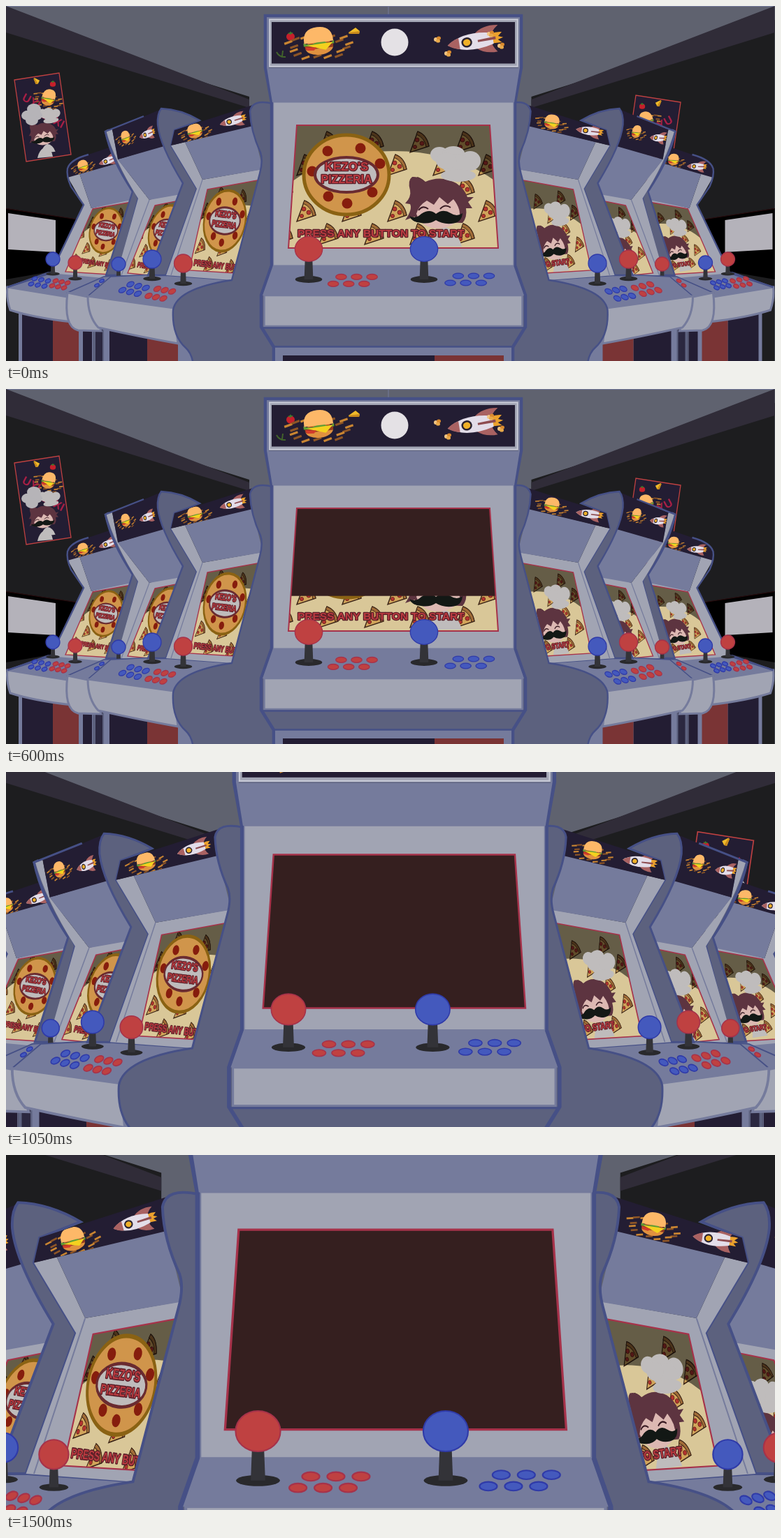
An HTML page with a canvas that plays this animation: 1100 by 509 pixels, repeating every 4500 ms.

```html
<!DOCTYPE html>
<html lang="en">
<head>
<meta charset="utf-8">
<title>Arcade</title>
<style>
html, body { margin: 0; width: 100%; height: 100%; overflow: hidden; background: #1d1d1f; }
canvas { display: block; }
</style>
</head>
<body>
<canvas id="stage" width="1100" height="509"></canvas>
<script>
const ctx = document.getElementById('stage').getContext('2d');
const LOOP = 4500, MIRROR = 1099.5;
const LIGHT = '#a1a4b3', BLUE = '#757b9c', SHADE = '#5c617e', EDGE = '#465086', NAVY = '#231d33';
const RED = '#bf4141', CRIMSON = '#a6324a', DOOR = '#7a3435', CLOTH = '#bfbcbc', HAIR = '#5d3440';
const PLAYER = { r: ['#bf4141', '#a6324a'], b: ['#4459bd', '#2f3aa8'] };

function shape(d, fill, stroke, width = 2) {
  const p = new Path2D(d);
  if (fill) { ctx.fillStyle = fill; ctx.fill(p); }
  if (stroke) { ctx.strokeStyle = stroke; ctx.lineWidth = width; ctx.stroke(p); }
}

function oval(x, y, rx, ry, fill, stroke, width = 2, turn = 0) {
  ctx.beginPath();
  ctx.ellipse(x, y, rx, ry, turn, 0, 7);
  if (fill) { ctx.fillStyle = fill; ctx.fill(); }
  if (stroke) { ctx.strokeStyle = stroke; ctx.lineWidth = width; ctx.stroke(); }
}

function group(draw, ...matrix) {
  ctx.save();
  if (matrix.length) ctx.transform(...matrix);
  draw();
  ctx.restore();
}

const unflip = () => ctx.transform(-1, 0, 0, 1, MIRROR, 0);

function label(text, x, y, size, align = 'center') {
  ctx.font = `bold ${size}px "Liberation Sans", Arial, sans-serif`;
  ctx.textAlign = align;
  ctx.textBaseline = 'middle';
  ctx.lineJoin = 'round';
  ctx.strokeStyle = '#5a1f28';
  ctx.lineWidth = 2.6;
  ctx.strokeText(text, x, y);
  ctx.fillStyle = '#bb3b40';
  ctx.fillText(text, x, y);
}

// Marquee icons, drawn around the origin
function burger() {
  for (let i = 0; i < 18; i++) {
    const a = i * 0.36 - 0.55, r = 25 + (i * 7 % 10);
    group(() => {
      ctx.fillStyle = i % 2 ? '#c98532' : '#8d5526';
      ctx.fillRect(-6, -1.6, 12, 3.2);
    }, 0.94, -0.34, 0.34, 0.94, Math.cos(a) * r * 1.4, Math.sin(a) * r * 0.55 + 7);
  }
  group(() => {
    oval(0, 9, 20, 11, '#e0913f');
    shape('M-21 3 L21 3 L20 11 L-20 11Z', '#8f3b22');
    shape('M-22 1 Q-12 6 -4 2 T10 3 T22 1 L22 6 L-22 6Z', '#5f9d35');
    shape('M-18 5 L20 4 L9 14Z', '#f4d11f');
    shape('M-20 7 L-4 9 L-8 13 L-18 12Z', '#d23b2b');
    shape('M-21 2 Q-22 -20 0 -20 Q22 -20 21 2Z', '#fdb868');
  }, 0.99, -0.12, 0.12, 0.99, 0, 0);
}

function rocket() {
  group(() => {
    shape('M28 -7 Q36 -9 44 -7 L38 -2 L45 1 L37 3 L42 8 L28 7Z', '#eba12d');
    shape('M4 -10 Q18 -22 40 -18 Q28 -10 28 -2Z M4 10 Q16 21 34 20 Q26 10 28 2Z', '#a96262');
    shape('M-36 0 Q-10 -18 30 -8 L30 8 Q-10 18 -36 0Z', '#e3dde9');
    shape('M-36 0 Q-29 -6 -19 -8 L-19 8 Q-29 6 -36 0Z', '#a96262');
    oval(-8, 0, 6.5, 6, '#efb028', '#2a2230', 2.5);
    shape('M8 -1 L34 -2 L34 2 L8 2Z', '#8e4c50');
  }, 0.98, -0.16, 0.16, 0.98, 0, 0);
}

function tomato() {
  oval(0, 0, 6, 5.5, '#c5202b');
  shape('M-4 -5 L0 -3 L4 -6 L1 -6 L0 -8 L-1 -6Z', '#3f7c2c');
}

function cheese() {
  shape('M-8 2 L2 -5 L8 0 L7 4 L-7 4Z', '#f0bb2a');
  shape('M-8 2 L8 0 L7 4 L-7 4Z', '#c98a1c');
}

function popcorn(x, y) {
  oval(x - 2, y, 3, 3, '#f2c583');
  oval(x + 2, y - 2, 3, 2.6, '#d98a2e');
  oval(x + 1, y + 2, 3, 2.6, '#e8a94a');
}

function icon(draw, x, y, sx, sy, turn) {
  const c = Math.cos(turn), s = Math.sin(turn);
  group(draw, c * sx, s * sx, -s * sy, c * sy, x, y);
}

// Game picture, in the coordinates of the middle screen
function slice(x, y) {
  group(() => {
    shape('M-3 -15 Q10 -10 13 6 L-14 15Z', '#d1a45a', '#3b2417', 1.4);
    shape('M-3 -15 Q10 -10 13 6 L9 7 Q7 -6 -5 -11Z', '#a26d38', '#3b2417', 1);
    oval(-4, -3, 3, 3, '#b5342f', '#5c1c18', 0.8);
    oval(3, 2, 3, 3, '#b5342f', '#5c1c18', 0.8);
    oval(-7, 7, 2.6, 2.6, '#b5342f', '#5c1c18', 0.8);
  }, 1, 0, 0, 1, x, y);
}

function pizza() {
  oval(487, 242, 61, 57, '#d0954b', '#8a6213', 5);
  [[460, 208], [507, 204], [438, 237], [535, 226], [461, 273], [524, 267], [488, 283]]
    .forEach(([x, y]) => oval(x, y, 7.5, 7.5, '#861d0d'));
  oval(487, 242, 45, 25, CLOTH, '#6a2b30', 4);
  label("KEZO'S", 487, 231, 17);
  label('PIZZERIA', 487, 250, 16);
}

function chef() {
  shape('M606 345 Q612 322 628 317 Q646 322 652 345Z', CLOTH);
  shape('M571 307 Q582 291 578 284 L571 283 Q580 274 578 264 Q574 250 581 245 Q592 244 600 252 '
    + 'Q622 242 644 254 Q656 262 660 274 L669 274 L661 281 L667 290 L658 290 Q660 303 653 311 L584 309 L585 302Z', HAIR);
  shape('M587 298 Q590 286 602 279 L612 285 L620 274 L632 284 L640 277 Q652 292 648 305 Q637 319 617 319 Q594 318 587 298Z', '#dcb8b2');
  shape('M590 293 Q596 285 604 291 M621 291 Q628 283 636 289', null, '#3a1c24', 2);
  shape('M577 301 Q586 306 594 298 Q606 290 615 298 Q625 290 636 297 Q645 303 653 297 Q652 311 637 312 '
    + 'Q624 313 615 307 Q606 313 594 311 Q580 310 577 301Z', '#131815');
  [[620, 213, 13, 11], [640, 211, 16, 10], [664, 222, 15, 14], [646, 228, 22, 15], [630, 222, 15, 12], [647, 243, 25, 9]]
    .forEach(([x, y, rx, ry]) => oval(x, y, rx, ry, CLOTH));
}

function game() {
  ctx.fillStyle = '#d9c798';
  ctx.fillRect(250, 60, 600, 400);
  for (let r = 0; r < 5; r++)
    for (let c = 0; c < 5; c++) slice(397 + r % 2 * 33 + 65 * c, 195 + 33 * r);
  ctx.beginPath();
  ctx.rect(250, 60, 600, 270);
  ctx.moveTo(745, 330);
  ctx.ellipse(555, 330, 190, 122, 0, 0, Math.PI, true);
  ctx.closePath();
  ctx.fillStyle = 'rgba(0,0,0,.535)';
  ctx.fill('evenodd');
  pizza();
  chef();
  label('PRESS ANY BUTTON TO START', 417, 327, 15.5, 'left');
}

function joystick(x, y, rx, ry, foot, player) {
  const w = rx * 0.24;
  oval(x, foot, rx * 0.98, rx * 0.25, '#29292c');
  shape(`M${x - w} ${y} L${x + w} ${y} L${x + w * 1.35} ${foot} L${x - w * 1.35} ${foot}Z`, '#333338');
  oval(x, y, rx, ry, PLAYER[player][0], PLAYER[player][1], 1.3);
}

function buttons(x, y, dx, dy, off, drop, rx, ry, player, turn = 0) {
  for (let i = 0; i < 6; i++) {
    const c = i % 3, low = i > 2;
    oval(x + c * dx - (low ? off : 0), y + c * dy + (low ? drop : 0), rx, ry, ...PLAYER[player], 1.3, turn);
  }
}

// Side machines, described for the left wall; the right wall mirrors them
const FAR = {
  legs: [['M18 438 H124 V509 H18Z', BLUE], ['M23 440 H67 V509 H23Z', NAVY], ['M67 446 H104 V509 H67Z', DOOR], ['M110 460 H123 V509 H110Z', NAVY]],
  desk: 'M2 403 L60 382 L165 388 L92 418Z',
  front: 'M2 403 L94 418 V453 Q40 447 6 436 Q0 418 2 403Z',
  body: 'M88 245 L105 240 L122 290 L200 270 L160 392 L64 383 L111 285Z',
  canopy: 'M105 240 L165 224 L192 266 L184 277 L122 290Z',
  screen: 'M124 291 L190 279 L165 386 L85 381Z',
  head: 'M90 231 Q95 223 112 215 L165 197 V224 L88 246Z',
  rim: 'M118 213 Q92 220 88 233 Q86 243 93 259 L111 285 L64 383 L2 403',
  art: [[.37, .06, -.12, .56, 143, 322, 487, 242], [.38, -.06, .15, .52, 960, 317, 643, 226]],
  icons: [[110, 229, 145, 222, .36, .42, -.18], [955, 220, 987, 230, .36, .42, .22]],
  sticks: [[67, 363, 10, 384, 0], [99, 368, 10, 391, 1]],
  pads: [[41, 391, 9.5, 1.6, 5, 7.5, 4, 2.7, 0], [71, 394, 8.5, 1.5, 5, 7, 4, 2.7, 1]]
};
const MID = {
  legs: [['M124 455 H142 V509 H124Z', SHADE], ['M128 460 H138 V509 H128Z', '#2b2840']],
  desk: 'M88 411 L140 388 L215 384 L120 419Z',
  front: 'M88 411 L122 418 L136 466 L103 465 Q82 460 88 411Z',
  side: 'M142 180 Q152 220 181 266 L143 386 H160 L189 276 L146 178Z',
  body: 'M143 178 L152 177 L160 220 L205 278 L255 262 L213 388 L158 386 L189 276 Q155 222 143 178Z',
  canopy: 'M160 220 L238 196 L256 252 L250 270 L205 278Z',
  screen: 'M213 286 L252 278 L213 387 L174 383Z',
  head: 'M152 177 L222 148 L240 197 L160 220Z',
  line: 'M205 278 L165 386',
  rim: 'M197 158 L142 180 Q150 220 181 266',
  art: [[.38, .06, -.17, .63, 229, 322, 487, 242], [.4, -.07, .15, .6, 879, 317, 643, 226]],
  icons: [[171, 188, 201, 184, .3, .46, -.15], [902, 180, 932, 189, .3, .46, .3]],
  sticks: [[161, 370, 10, 393, 0]],
  pads: [[137, 394, 7.5, 1.8, 7, 6.5, 3.6, 2.2, 0]]
};
const NEAR = {
  legs: [['M140 455 H275 V509 H140Z', BLUE], ['M148 458 H202 V509 H148Z', NAVY], ['M202 464 H246 V509 H202Z', DOOR]],
  desk: 'M117 416 L150 388 L211 385 L323 393 Q250 405 240 434Z',
  front: 'M117 416 L240 433 L246 484 Q190 474 132 461 Q117 445 117 416Z',
  side: 'M222 147 Q250 148 277 164 L241 178 L236 200 L273 262 L229 386 H203 L253 254 Q220 200 217 170 Q216 155 222 147Z',
  body: 'M236 200 L256 195 L281 249 L366 234 L323 393 L229 386 L273 262Z',
  canopy: 'M256 195 L352 171 L366 228 L363 235 L281 249Z',
  screen: 'M288 263 L364 249 L328 383 L262 379Z',
  head: 'M241 178 L353 142 V172 L236 200Z',
  line: 'M281 249 L236 386',
  panel: 'M382 140 Q352 133 349 151 Q350 180 364 210 Q368 222 363 240 L323 393 Q244 405 239 436 Q237 472 257 490 Q266 498 268 515 H390Z',
  art: [[.48, .06, -.127, .76, 313, 308, 487, 242], [.5, -.07, .105, .69, 783, 352, 615, 302]],
  icons: [[270, 179, 323, 165, .5, .52, -.12], [781, 166, 833, 179, .5, .52, .3]],
  sticks: [[209, 363, 13, 391, 0], [253.5, 369, 13, 398, 1]],
  pads: [[178, 399, 11, 2.6, 11.5, 8.3, 5.5, 3.4, 0], [216.5, 405.5, 10.5, 1.9, 12.5, 10, 5.5, 3.4, 1]]
};

function machine(m, right) {
  const colours = right ? 'rb' : 'br';
  group(() => {
    if (right) unflip();
    m.legs.forEach(([d, fill]) => shape(d, fill));
    shape(m.desk, BLUE, EDGE, 1.5);
    shape(m.front, LIGHT, BLUE, 3);
    if (m.side) shape(m.side, SHADE, EDGE, 2.4);
    shape(m.body, LIGHT);
    if (m.line) shape(m.line, null, BLUE, 1.2);
    shape(m.canopy, BLUE);
    group(() => {
      ctx.clip(new Path2D(m.screen));
      if (right) unflip();
      const [a, b, c, d, x, y, u, v] = m.art[+right];
      group(game, a, b, c, d, x - a * u - c * v, y - b * u - d * v);
    });
    shape(m.screen, null, CRIMSON, 1.3);
    shape(m.head, NAVY);
    group(() => {
      ctx.clip(new Path2D(m.head));
      if (right) unflip();
      const [x, y, u, v, sx, sy, turn] = m.icons[+right];
      icon(burger, x, y, sx, sy, turn);
      icon(rocket, u, v, sx, sy, turn);
    });
    if (m.rim) shape(m.rim, null, EDGE, 2.4);
    m.pads.forEach(([x, y, dx, dy, off, drop, rx, ry, p]) =>
      buttons(x, y, dx, dy, off, drop, rx, ry, colours[p], -0.45));
    m.sticks.forEach(([x, y, r, foot, p]) => joystick(x, y, r, r, foot, colours[p]));
    if (m.panel) shape(m.panel, SHADE, EDGE, 2.4);
  });
}

function poster() {
  shape('M12 106 L76 96 L93 213 L29 223Z', NAVY, RED, 1.3);
  icon(burger, 61, 131, .45, .6, .35);
  icon(cheese, 44, 107, .6, .8, 1.2);
  icon(tomato, 67, 112, .7, .7, 0);
  ctx.font = '900 17px "Liberation Sans", Arial, sans-serif';
  ctx.textAlign = 'center';
  ctx.fillStyle = '#a81f45';
  group(() => ctx.fillText('UYI', 0, 0), .85, .45, -.45, .85, 34, 141);
  group(() => ctx.fillText('LEXI', 0, 0), .85, .45, -.45, .85, 64, 167);
  shape('M45 218 Q48 204 57 203 Q66 206 67 216Z', CLOTH);
  group(chef, .44, -.06, .04, .44, -230, 96);
  [[31, 157, 9], [40, 148, 10], [44, 157, 8], [37, 164, 9]].forEach(([x, y, r]) => oval(x, y, r, r * .8, '#b6b4b8'));
}

function room() {
  ctx.fillStyle = '#5f626f';
  ctx.fillRect(-20, -20, 1140, 560);
  shape('M0 .5 H1100 M547 0 V100', null, BLUE, 1);
  const wall = () => {
    shape('M0 20 L348 130 V509 H0Z', '#1d1d1f');
    shape('M0 290 L115 308 V372 L0 392Z', '#000');
    shape('M0 290.5 L115 308', null, '#2a0b0d', 1);
    shape('M0 0 L348 134 V146 L0 38Z', '#302c38');
    shape('M3 297 L71 307 V353 L3 349Z', '#b4b2ba');
  };
  wall();
  group(wall, -1, 0, 0, 1, MIRROR, 0);
  poster();
  group(poster, -1, 0, 0, 1, 977, 32);
}

function mainMachine(dark) {
  const quad = 'M416 171 H692 L704 347 H404Z';
  shape('M371 14 H737 V88 L728 138 V372 L743 415 V460 L725 489 V515 H383 V489 L365 460 V415 L380 372 V138 L371 88Z', SHADE, EDGE, 4.5);
  shape('M373 16 H735 V88 L727 138 H381 L373 88Z', BLUE);
  shape('M376 18 H733 V88 H376Z', LIGHT);
  shape('M377 19.5 H731.5 V86.5 H377Z', null, '#c9ccd9', 1.5);
  shape('M380 23 H728 V82.5 H380Z', NAVY);
  shape('M376 88.5 H733', null, SHADE, 1);
  icon(tomato, 407, 44, 1, 1, 0);
  icon(cheese, 498, 36, 1, 1, 0);
  shape('M387 66 Q391 74 400 73 M396 64 L395 72', null, '#42632b', 2);
  icon(burger, 447, 50, 1, 1, 0);
  icon(rocket, 667, 51, 1, 1, 0);
  [[617, 48], [632, 68], [708, 57], [693, 40]].forEach(([x, y]) => popcorn(x, y));
  oval(556, 52, 19.5, 19.5, '#e4e1e5');

  shape('M382.5 138 H726 V372 H382.5Z', LIGHT, BLUE, 1.2);
  group(() => {
    ctx.clip(new Path2D(quad));
    game();
    ctx.fillStyle = '#351f1f';
    ctx.fillRect(400, 168, 310, 3 + dark * 176);
  });
  shape(quad, null, CRIMSON, 2);

  shape('M382 372 H726 L741 415 H367Z', BLUE);
  shape('M369.5 415 H738.5 V459 H369.5Z', LIGHT, BLUE, 2.5);
  shape('M367 461.5 H741', null, EDGE, 2.5);
  shape('M385 489 H723 V515 H385Z', BLUE);
  shape('M383 488.5 H725', null, EDGE, 2.5);
  shape('M396 501 H613 V515 H396Z', NAVY);
  shape('M613 501 H712 V515 H613Z', DOOR);
  joystick(433, 348.5, 19.7, 17.8, 392, 'r');
  joystick(598, 348.5, 19.7, 17.8, 392, 'b');
  buttons(479.4, 388.4, 22.1, 0, 11.3, 10, 7.7, 3.9, 'r');
  buttons(646.8, 387, 22.1, 0, 11.3, 10, 7.7, 3.9, 'b');
}

const LIFT = [0, -60, -95.5, -119.4, -143.3, -171];

function render(time) {
  const step = time < 900 ? 0 : Math.min(5, 1 + Math.floor((time - 900) / 150));
  const dark = Math.min(1, Math.pow(Math.floor(time / 100) / 8, 1.17));
  const zoom = 1 + 0.1254 * step, x = -68.8 * step;
  ctx.setTransform(zoom, 0, 0, zoom, x, -37.2 * step);
  room();
  ctx.setTransform(zoom, 0, 0, zoom, x, LIFT[step]);
  for (const m of [FAR, MID, NEAR]) {
    machine(m, false);
    machine(m, true);
  }
  mainMachine(dark);
}

const start = performance.now();
function tick() {
  render((performance.now() - start) % LOOP);
  requestAnimationFrame(tick);
}
tick();
</script>
</body>
</html>
```
